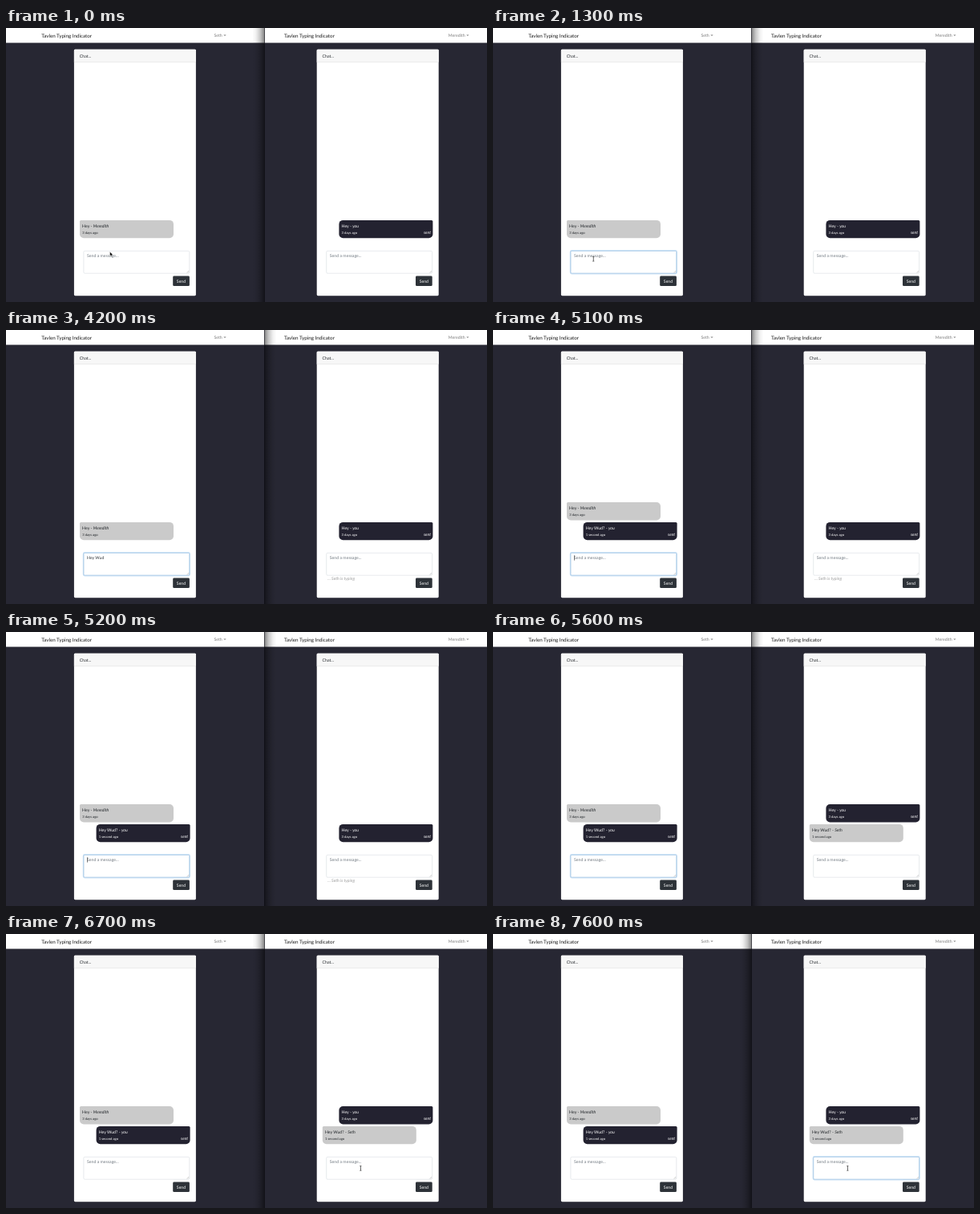
An HTML page with a canvas that plays this animation: 600 by 342 pixels, repeating every 8 s.

```html
<!DOCTYPE html>
<html lang="en">
<head>
<meta charset="utf-8">
<title>Typing indicator</title>
<style>
  html, body { margin: 0; width: 100%; height: 100%; overflow: hidden; background: #272733; }
  canvas { display: block; width: 600px; height: 342px; }
</style>
</head>
<body>
<canvas id="stage"></canvas>
<script>
const LOOP = 8000, W = 600, H = 342, SPLIT = 322.4, OFFSET = 302.8;
const INK = '#212529', NIGHT = '#272733', BUBBLE = '#232230';
const LEFT_USER = 'Seth', RIGHT_USER = 'Meredith';

const canvas = document.getElementById('stage');
const ctx = canvas.getContext('2d');
const dpr = window.devicePixelRatio || 1;
canvas.width = W * dpr;
canvas.height = H * dpr;

// Each key press: time and the text in the left box afterwards.
const KEYS = [
  [800, ''], [1700, 'H'], [1800, 'He'], [2100, 'Hey '], [2700, 'Hey W'],
  [3000, 'Hey Wu'], [3700, 'Hey Wud'], [4800, 'Hey Wud?'], [5100, '']
];
const SENT = 5100, RECEIVED = 5300, SWITCH = 6600, RIGHT_FOCUS = 7100;

const between = (t, a, b) => t >= a && t < b;
const clamp = v => Math.max(0, Math.min(1, v));
const ease = v => v * v * (3 - 2 * v);
const blink = (t, since) => (t - since) % 1000 < 500;

function setFont(size, style = '') {
  ctx.font = `${style} ${size}px Lato, "Open Sans", sans-serif`;
}

function text(str, x, y, { size = 5.2, color = INK, style = '', align = 'left' } = {}) {
  setFont(size, style);
  ctx.fillStyle = color;
  ctx.textAlign = align;
  ctx.fillText(str, x, y);
  return ctx.measureText(str).width;
}

function box(x, y, w, h, r, fill, stroke, line = 0.5) {
  ctx.beginPath();
  ctx.roundRect(x, y, w, h, r);
  if (fill) { ctx.fillStyle = fill; ctx.fill(); }
  if (stroke) { ctx.strokeStyle = stroke; ctx.lineWidth = line; ctx.stroke(); }
}

function polygon(points, fill) {
  ctx.beginPath();
  points.forEach(([x, y]) => ctx.lineTo(x, y));
  ctx.closePath();
  ctx.fillStyle = fill;
  ctx.fill();
}

function message(y, body, author, age, own) {
  const x = own ? 112.6 : 92;
  const color = own ? '#fff' : INK;
  box(x, y, 117, 22.3, own ? [5, 1.5, 5, 5] : [1.5, 5, 5, 5], own ? BUBBLE : '#cacaca');
  const lead = text(body + ' - ', x + 3.1, y + 9, { color });
  text(author, x + 3.1 + lead, y + 9, { color, style: 'italic' });
  text(age, x + 3.2, y + 16.6, { color, size: 4.2 });
  if (own) text('sent', x + 114.6, y + 16.8, { color, style: 'italic', align: 'right' });
}

function textarea(value, focus, caret) {
  if (focus > 0) {
    ctx.globalAlpha = focus;
    box(96.4, 277.7, 133, 29.1, 1.8, null, '#cde3f6', 1.2);
    ctx.globalAlpha = 1;
  }
  box(96.9, 278.3, 131.9, 27.9, 1.4, '#fff', '#ced4da');
  if (focus > 0) {
    ctx.globalAlpha = focus;
    box(96.9, 278.3, 131.9, 27.9, 1.4, null, '#8fc0e9', 0.6);
    ctx.globalAlpha = 1;
  }
  ctx.strokeStyle = '#999';
  ctx.lineWidth = 0.4;
  for (const d of [1.2, 2.6]) {
    ctx.beginPath();
    ctx.moveTo(228.2 - d, 305.5);
    ctx.lineTo(228.2, 305.5 - d);
    ctx.stroke();
  }
  text(value || 'Send a message...', 101, 286.4, { color: value ? '#33383d' : '#727a82' });
  if (caret) {
    setFont(5.2);
    ctx.fillStyle = '#222';
    ctx.fillRect(101 + ctx.measureText(value).width, 281.2, 0.6, 6.4);
  }
}

function page(p) {
  ctx.fillStyle = NIGHT;
  ctx.fillRect(-10, 0, 340, H);
  ctx.fillStyle = '#fff';
  ctx.fillRect(-10, 0, 340, 18.5);
  text('Tavlen Typing Indicator', 44.2, 11.6, { size: 6.25, color: '#1c1c1c' });
  const end = p.nameEnd;
  text(p.user, end, 11, { color: '#7b7b7b', align: 'right' });
  polygon([[end + 1.7, 8.4], [end + 4.9, 8.4], [end + 3.3, 10.1]], '#7b7b7b');

  box(84.9, 26.7, 152, 307.5, 1.4, '#fff');
  box(84.9, 26.7, 152, 15.9, [1.4, 1.4, 0, 0], '#f7f7f7');
  ctx.fillStyle = '#dcdcdc';
  ctx.fillRect(84.9, 42.2, 152, 0.5);
  text('Chat...', 91.8, 36.6);

  p.messages.forEach((m, i) => message(239.9 - 24.8 * (p.messages.length - 1 - i), ...m));
  textarea(p.value, p.focus, p.caret);
  if (p.typing) text(`... ${LEFT_USER} is typing`, 98.4, 311.9, { color: '#999', style: 'italic' });
  box(208.2, 309.6, 20.7, 12.5, 1.4, '#2d3238');
  text('Send', 218.5, 317.7, { color: '#fff', align: 'center' });
}

function windowShadow(leftActive) {
  const width = 15, far = SPLIT + (leftActive ? width : -width);
  const g = ctx.createLinearGradient(SPLIT, 0, far, 0);
  g.addColorStop(0, 'rgba(0,0,0,.48)');
  g.addColorStop(0.35, 'rgba(0,0,0,.22)');
  g.addColorStop(0.7, 'rgba(0,0,0,.06)');
  g.addColorStop(1, 'rgba(0,0,0,0)');
  ctx.fillStyle = g;
  ctx.fillRect(Math.min(SPLIT, far), 0, width, H);
  ctx.fillStyle = 'rgba(10,10,16,.75)';
  ctx.fillRect(SPLIT - 0.4, 0, 0.8, H);
}

function arrow(x, y) {
  const shape = [[0, 0], [0, 5.4], [1.3, 4.3], [2.2, 6.2], [3, 5.8], [2.2, 4], [3.8, 3.9]]
    .map(([dx, dy]) => [x + dx, y + dy]);
  polygon(shape, '#000');
  ctx.strokeStyle = '#fff';
  ctx.lineWidth = 0.4;
  ctx.stroke();
}

function iBeam(x, y) {
  ctx.fillStyle = '#222';
  ctx.fillRect(x - 0.35, y - 2.9, 0.7, 5.8);
  ctx.fillRect(x - 1.2, y - 3.1, 2.4, 0.5);
  ctx.fillRect(x - 1.2, y + 2.6, 2.4, 0.5);
}

function pointer(t) {
  if (t < 100) return arrow(129.6, 279.3);
  if (t < 400) return arrow(125.3, 286.7);
  if (t < 1700) return iBeam(125.2, 288.2);
  if (t < 5800) return;
  if (t >= SWITCH) return iBeam(442.3, 292.3);
  const k = ease(clamp((t - 5700) / 700));
  const x = 125.2 + 316.3 * k, y = 288.2 + 4.9 * k;
  x < 229 ? iBeam(x, y) : arrow(x, y);
}

function draw(time) {
  const t = Math.floor((time % LOOP) / 100) * 100;
  const lastKey = KEYS.filter(([at]) => at <= t).pop();
  const leftFocus = t < SWITCH ? clamp((t - 700) / 200) : clamp((6800 - t - 100) / 200);
  const leftMessages = [['Hey', RIGHT_USER, '3 days ago', false]];
  const rightMessages = [['Hey', 'you', '3 days ago', true]];
  if (t >= SENT) leftMessages.push(['Hey Wud?', 'you', '1 second ago', true]);
  if (t >= RECEIVED) rightMessages.push(['Hey Wud?', LEFT_USER, '1 second ago', false]);

  ctx.setTransform(dpr, 0, 0, dpr, 0, 0);
  ctx.textRendering = 'geometricPrecision';
  page({
    user: LEFT_USER, nameEnd: 269.7, messages: leftMessages,
    value: lastKey ? lastKey[1] : '', focus: leftFocus,
    caret: lastKey && t < SWITCH && blink(t, lastKey[0])
  });

  ctx.save();
  ctx.beginPath();
  ctx.rect(SPLIT, 0, W - SPLIT, H);
  ctx.clip();
  ctx.translate(OFFSET, 0);
  page({
    user: RIGHT_USER, nameEnd: 269.8, messages: rightMessages,
    value: '', focus: clamp((t - 7000) / 200),
    caret: t >= RIGHT_FOCUS && blink(t, RIGHT_FOCUS),
    typing: between(t, 1900, 3700) || between(t, 4100, RECEIVED)
  });
  ctx.restore();

  windowShadow(between(t, 400, SWITCH));
  pointer(t);
}

const start = performance.now();
function tick() {
  draw(performance.now() - start);
  requestAnimationFrame(tick);
}
tick();
</script>
</body>
</html>
```
